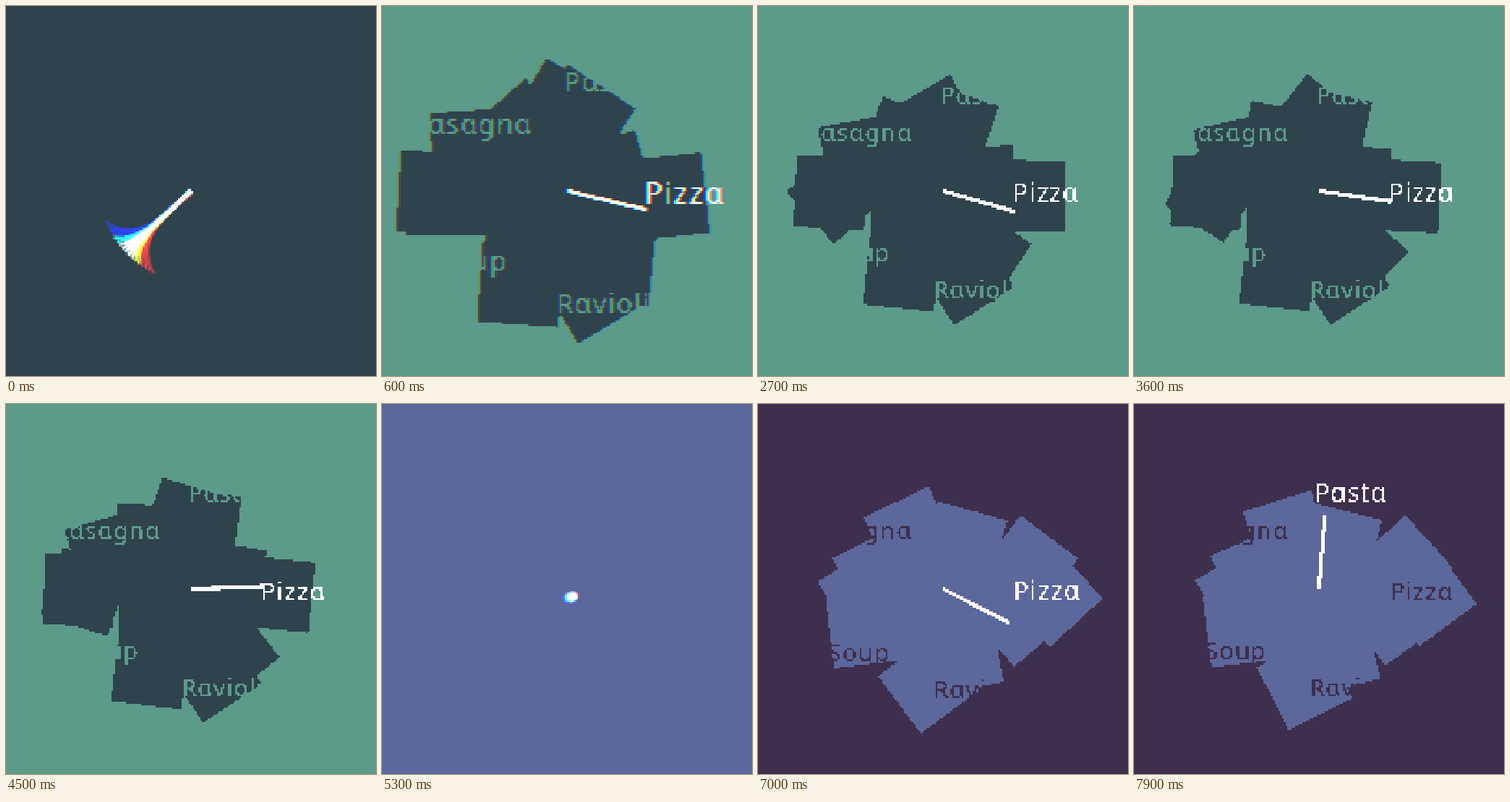
These frames come from a looping animation (512x512 px, 8 s). An HTML page with a canvas:

```html
<!DOCTYPE html>
<html lang="en">
<head>
<meta charset="utf-8">
<title>Dinner wheel</title>
<style>
  html, body { margin: 0; width: 100%; height: 100%; overflow: hidden; background: #2f434c; }
  canvas { display: block; width: 100vw; height: 100vh; image-rendering: pixelated; }
</style>
</head>
<body>
<canvas id="stage"></canvas>
<script>
const LOOP = 8000, STEP = 100, CUT = 5200;
const N = 200, K = N / 512;          // coarse pixel grid
const SIDE = 97, RAD = Math.PI / 180;
const WORDS = ['Pizza', 'Ravioli', 'Soup', 'Lasagna', 'Pasta'];
const FONT = '33px "Noto Sans", "DejaVu Sans", sans-serif';

const clamp = x => Math.min(1, Math.max(0, x));
const smooth = x => clamp(x) ** 2 * (3 - 2 * clamp(x));

// Squares are [x, y, tilt], ordered by how far they turn (see spin).
const SCENES = [
  {
    outer: '#5c9a8a', inner: '#2f434c', from: 600, to: 4500, end: CUT,
    squares: [
      [-8, -93, 31], [-146, 4, 0], [-54, -67, 48], [15, -85, 33],
      [-114, -48, -4], [30, 117, -31], [-154, 2, 3], [-56, 112, 4],
      [118, 7, -6], [48, -13, -16], [54, 86, 6]
    ],
    spin: i => 46 * (i - 6) * Math.abs(i - 6) / 16,
    swing: p => 18.5 * Math.cos((p - 1850) / 1572)
  },
  {
    outer: '#3e2f4e', inner: '#5c679b', from: 1000, to: 2700, end: Infinity,
    squares: [
      [25, 88, -9], [27, -59, 17], [-105, 53, -7], [-103, 6, -33],
      [-85, -20, -30], [102, 37, -45], [148, 10, -49], [-43, -74, -33],
      [-20, 128, -46], [115, -32, 26]
    ],
    spin: i => 3.1 * i - 6,
    swing: p => 52 - 137.5 * smooth((p - 1500) / 1100)
  }
];

function makeCanvas(el = document.createElement('canvas')) {
  el.width = el.height = N;
  return el.getContext('2d', { willReadFrequently: true });
}
const screen = makeCanvas(document.getElementById('stage'));
const frame = makeCanvas(), scratch = makeCanvas();

function center(c) { c.setTransform(K, 0, 0, K, N / 2, N / 2); }
function reset(c) { c.setTransform(1, 0, 0, 1, 0, 0); }

// Draws one colour with hard, unsmoothed edges.
function layer(color, draw) {
  reset(scratch);
  scratch.clearRect(0, 0, N, N);
  scratch.fillStyle = scratch.strokeStyle = color;
  center(scratch);
  draw(scratch);
  const img = scratch.getImageData(0, 0, N, N), d = img.data;
  const rgb = [1, 3, 5].map(i => parseInt(color.slice(i, i + 2), 16));
  for (let i = 0; i < d.length; i += 4) {
    const alpha = d[i + 3] > 105 ? 255 : 0;
    d.set([...rgb, alpha], i);
  }
  scratch.putImageData(img, 0, 0);
  frame.drawImage(scratch.canvas, 0, 0);
}

function drawSquares(c, scene, p, zoom) {
  const ease = x => Math.pow(x, 0.75);
  const u = (ease(p) - ease(scene.from)) / (ease(scene.to) - ease(scene.from));
  c.scale(zoom, zoom);
  c.fillRect(-98, -40, 172, 128);    // solid core
  scene.squares.forEach(([x, y, tilt], i) => {
    c.save();
    c.translate(x, y);
    c.rotate((tilt + scene.spin(i) * u) * RAD);
    c.fillRect(-SIDE / 2, -SIDE / 2, SIDE, SIDE);
    c.restore();
  });
}

function drawWord(c, i, zoom, grow, weight) {
  const a = i * 72 * RAD, r = 141 * zoom, s = zoom * grow;
  c.save();
  c.translate(r * Math.cos(a), r * Math.sin(a) + 2);
  c.scale(s, s);
  c.font = weight + ' ' + FONT;
  c.letterSpacing = '1.4px';
  c.textAlign = 'center';
  c.fillText(WORDS[i].replace(/a/g, '\u0251'), 0, 12);   // single-storey a
  c.restore();
}

function drawNeedle(c, angle, length) {
  c.lineWidth = 5;
  c.beginPath();
  c.moveTo(0, 0);
  c.lineTo(length * Math.cos(angle), length * Math.sin(angle));
  c.stroke();
}

// The whipping needle: bent strokes split into a spectrum.
function drawFan(c, angle, length, bend) {
  for (let k = -1; k <= 1; k += 0.125) {
    const r = k < 0.3 ? 255 : 0, g = Math.abs(k) < 0.6 ? 255 : 0, b = k > -0.3 ? 255 : 0;
    c.strokeStyle = `rgb(${r},${g},${b})`;
    c.lineWidth = 4.5 - 3 * Math.abs(k);
    c.beginPath();
    for (let q = 0; q <= 1.001; q += 0.05) {
      const a = angle + k * bend * q ** 4;
      c.lineTo(q * length * Math.cos(a) - 3 * k * Math.sin(angle),
               q * length * Math.sin(a) + 3 * k * Math.cos(angle));
    }
    c.stroke();
  }
}

function drawDot(c) {
  ['#00f', '#0f0', '#f00'].forEach((color, i) => {
    c.fillStyle = color;
    c.beginPath();
    c.ellipse(4 + 2 * i, 12 - i, 10 - i, 8 - i, -0.3, 0, 7);
    c.fill();
  });
}

// Red and blue slip sideways while the wheel is still rushing in.
function present(slip) {
  reset(screen);
  screen.globalCompositeOperation = 'source-over';
  screen.drawImage(frame.canvas, 0, 0);
  if (!slip) return;
  screen.fillStyle = '#000';
  screen.fillRect(0, 0, N, N);
  screen.globalCompositeOperation = 'lighter';
  reset(scratch);
  ['#f00', '#0f0', '#00f'].forEach((mask, i) => {
    scratch.drawImage(frame.canvas, 0, 0);
    scratch.drawImage(frame.canvas, slip * (1 - i), 0);
    scratch.globalCompositeOperation = 'multiply';
    scratch.fillStyle = mask;
    scratch.fillRect(0, 0, N, N);
    scratch.globalCompositeOperation = 'source-over';
    screen.drawImage(scratch.canvas, 0, 0);
  });
}

function render(t) {
  const scene = SCENES[t < CUT ? 0 : 1];
  const p = t < CUT ? t : t - CUT;
  const exit = clamp((p - scene.end + 300) / 300);
  const rush = 0.15 * Math.pow(600 / Math.max(p, 60), 1.8);
  const zoom = (1 + rush) * (1 + 3 * exit ** 3);

  const deg = scene.swing(p) + 130 * Math.exp(-p / 90) + 140 * exit ** 3;
  const angle = deg * RAD;
  const dip = 1 - 0.88 * clamp(1 - Math.abs(p - 100) / 100);
  const length = 102 * (1 + 0.65 * Math.min(rush, 0.33) + 0.2 * exit) * dip;
  const bend = 22 * Math.max(clamp(1 - p / 300), exit) * RAD;
  const pick = ((Math.round(deg / 72) % 5) + 5) % 5;
  const whip = bend > 0.01;

  reset(frame);
  frame.fillStyle = p <= 100 ? scene.inner : scene.outer;
  frame.fillRect(0, 0, N, N);
  if (p > 100) {
    layer(scene.inner, c => drawSquares(c, scene, p, zoom));
    layer(scene.outer, c => WORDS.forEach((w, i) => {
      if (i !== pick) drawWord(c, i, zoom, 1, 400);
    }));
    layer('#ffffff', c => {
      drawWord(c, pick, zoom, 1.04 + 0.5 * Math.min(rush, 0.3), 500);
      if (!whip) drawNeedle(c, angle, length);
    });
  }
  present(p > 100 && p < 800 ? 1 : 0);

  if (whip) {
    center(screen);
    screen.globalCompositeOperation = 'lighter';
    if (length < 30) drawDot(screen);
    else drawFan(screen, angle, length, bend);
  }
}

let shown = -1;
const start = performance.now();
function tick() {
  const t = Math.floor(((performance.now() - start) % LOOP) / STEP) * STEP;
  if (t !== shown) render(shown = t);
  requestAnimationFrame(tick);
}
tick();
</script>
</body>
</html>
```
